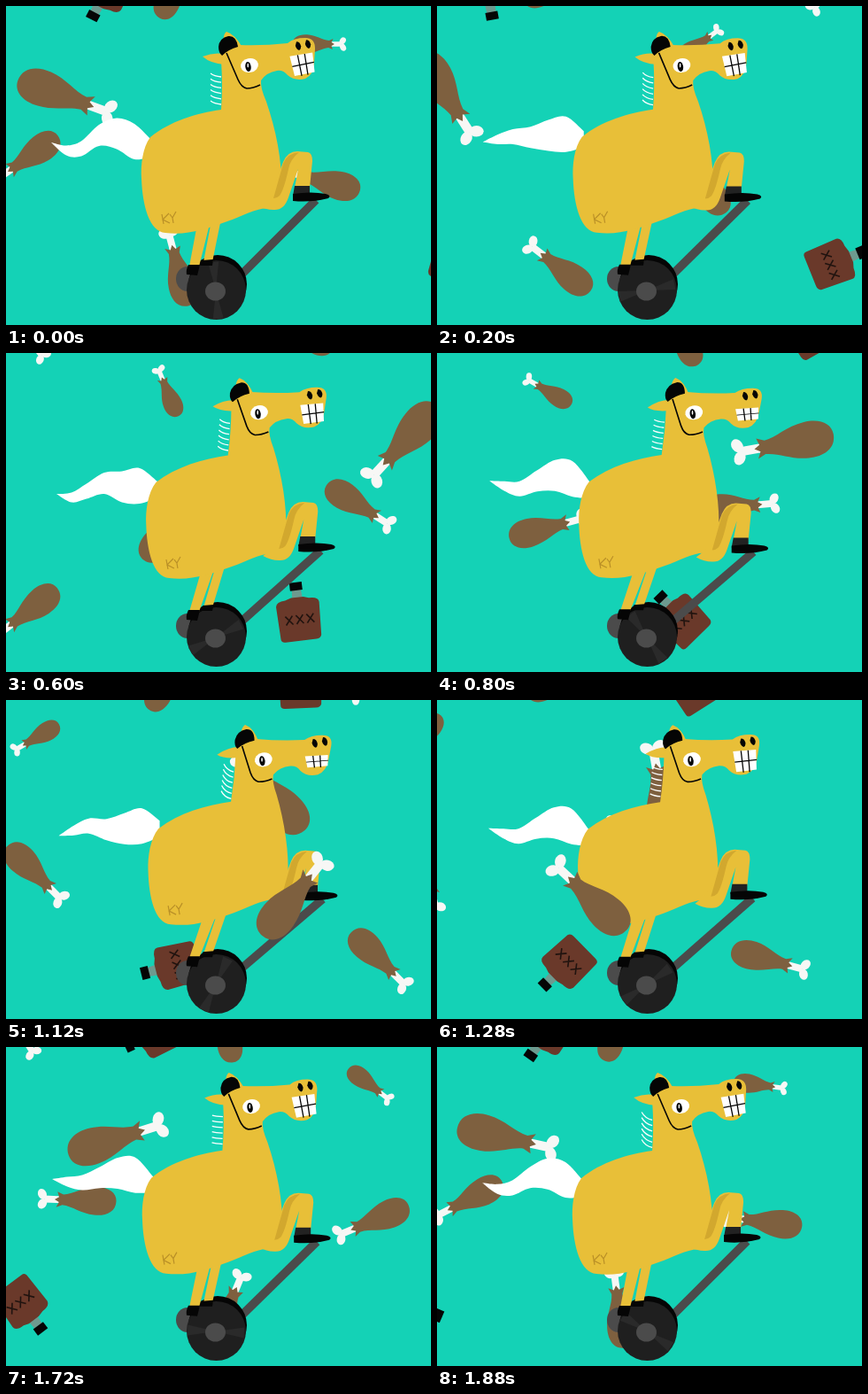
Animation of 480 by 360 pixels, one loop 1.92 s. Source, as an HTML page with a canvas:

```html
<!DOCTYPE html>
<html lang="en">
<head>
<meta charset="utf-8">
<title>Horse on a scooter</title>
<style>
html, body { margin: 0; width: 100%; height: 100%; overflow: hidden; background: #14d2b6 }
canvas { display: block }
</style>
</head>
<body>
<canvas id="stage" width="480" height="360"></canvas>
<script>
const g = document.getElementById('stage').getContext('2d');
const STEPS = 48, STEP_MS = 40, SPAN = 550, TURN = 7.5;
const SKY = '#14d2b6', COAT = '#e8bf38', SHADE = '#d2a82e', MEAT = '#7e603f',
      GLASS = '#6a392a', GREY = '#4b4b4b', TYRE = '#1f1f1f', BLACK = '#050505';
const rad = d => d * Math.PI / 180;
const lerp = (a, b, u) => a + (b - a) * u;
const clamp = v => Math.max(0, Math.min(1, v));

// Linear blend between rows [step, ...values], wrapping at the period
function key(rows, n, period) {
  n %= period;
  let i = rows.length - 1;
  while (rows[i][0] > n) i--;
  const a = rows[i], b = rows[i + 1] || [period, ...rows[0].slice(1)];
  const u = (n - a[0]) / (b[0] - a[0]);
  return a.slice(1).map((v, j) => lerp(v, b[j + 1], u));
}

// Path text whose "x,y" pairs pass through a bending function
function bend(d, map) {
  return new Path2D(map ? d.replace(/(-?[\d.]+),(-?[\d.]+)/g, (_, x, y) => map(+x, +y).join(',')) : d);
}
function fill(color, d, map) {
  g.fillStyle = color;
  g.fill(bend(d, map));
}
function line(color, width, d, map) {
  g.strokeStyle = color;
  g.lineWidth = width;
  g.stroke(bend(d, map));
}
function oval(color, x, y, rx, ry = rx, turn = 0) {
  g.fillStyle = color;
  g.beginPath();
  g.ellipse(x, y, rx, ry, turn, 0, 7);
  g.fill();
}
function at(x, y, deg, scale, draw) {
  g.save();
  g.translate(x, y);
  g.rotate(rad(deg));
  g.scale(scale, scale);
  draw();
  g.restore();
}
// Smooth curve through all points, continuing the current path
function curve(pts) {
  for (let i = 0; i < pts.length - 1; i++) {
    const a = pts[i], b = pts[i + 1], before = pts[i - 1] || a, after = pts[i + 2] || b;
    g.bezierCurveTo(a[0] + (b[0] - before[0]) / 6, a[1] + (b[1] - before[1]) / 6,
                    b[0] - (after[0] - a[0]) / 6, b[1] - (after[1] - a[1]) / 6, ...b);
  }
}

function drumstick() {
  fill('#f7f7f5', 'M16,-4 L36,-4 L37,4 L16,4Z');
  oval('#f7f7f5', 39, -5.5, 6.3, 4.9, -1);
  oval('#f7f7f5', 39.5, 5.5, 6.3, 4.9, 1.1);
  fill(MEAT, 'M-46,1 C-46,-12 -34,-17 -21,-16 C-6,-15 4,-7 16,-6 L23,-9 L20,-3 L25,0 L20,3 L22,9 L15,6 C4,7 -6,15 -22,16 C-36,17 -46,11 -46,1Z');
}

function bottle() {
  g.translate(-5, -5);
  fill('#6d9a8f', 'M22,-6 L34,-5 L34,5 L22,6Z');
  fill(BLACK, 'M33,-7 L42,-7 L42,7 L33,7Z');
  fill(GLASS, 'M-20,-24 L17,-25 Q23,-24 23,-14 L25,-7 L25,7 L23,13 Q23,24 17,24 L-20,22 Q-24,21 -24,16 L-24,-19 Q-24,-24 -20,-24Z');
  for (const y of [-12, 0, 12]) line('#20130f', 1.6, `M-5,${y - 4} L5,${y + 4} M5,${y - 4} L-5,${y + 4}`);
}

// Flying things: step, x and angle at that step, height, scale, spin direction
const flyers = [
  [20, 390, 170, 103, 1.28, 1, drumstick],
  [20, 343, -5, 173, 0.98, -1, drumstick],
  [20, 126, -15, 197, 1, 1, drumstick],
  [20, 125, 210, 43, 0.67, -1, drumstick],
  [28, 423, 45, 294, 1, -1, drumstick],
  [39, 295, 230, -22, 0.87, 1, drumstick],
  [20, 276, 245, -22, 0.87, 1, drumstick],
  [9, 405, -52, 295, 1, -1, bottle],
  [39, 212, 185, -20, 1, -1, bottle]
];
function drawFlyers(n) {
  for (const [n0, x0, a0, y, scale, spin, draw] of flyers) {
    const x = x0 - (n - n0) * SPAN / STEPS, angle = a0 + (n - n0) * TURN * spin;
    for (const lap of [-1, 0, 1]) at(x + lap * SPAN, y, angle, scale, draw);
  }
}

const tailX = [165, 145, 125, 105, 85, 68, 51];
const tailWidth = [9, 20, 17.5, 12, 8.5, 5.5, 0];
const tailY = [
  [0, 161, 153, 144, 146, 161, 163, 154],
  [3, 156, 152, 153, 149, 158, 165, 161],
  [4, 148, 145, 148, 149, 145, 150, 156],
  [8, 158, 145, 141, 147, 156, 153, 147],
  [9, 158, 144, 142, 150, 155, 155, 152]
];
function drawTail(n, k) {
  const ys = key(tailY, n, 12);
  const side = s => tailX.map((x, i) => [x + 9 * k, ys[i] - 3 * k + s * tailWidth[i]]);
  const top = side(-1);
  g.fillStyle = '#fff';
  g.beginPath();
  g.moveTo(...top[0]);
  curve(top);
  curve(side(1).reverse());
  g.fill();
}

function drawScooter(n, k) {
  oval(GREY, 205, 308, 13, 14);
  line(GREY, 9.5, `M267,302 L${350 + 8 * k},${219 + 6 * k}`);
  oval(BLACK, 239, 314, 33);
  oval(TYRE, 237.5, 320.5, 33.5);
  at(237, 321, 85 + n * 52.5, 1, () => fill('#2a2a2a', 'M0,0 L32,-6 L32,6Z M0,0 L-32,-6 L-32,6Z'));
  oval(GREY, 236.5, 322, 11.5, 10.5);
}

const maneSlope = [[0, 4], [9, 7], [20, 3], [28, 9], [32, 3], [39, -6], [47, 9]];
const grin = [[0, 1], [14, 1], [20, 0.58], [28, 0.56], [32, 1.02], [39, 1.05], [47, 1]];

function drawHorse(n, k) {
  // The body leans: the higher the point, the farther it sways; the head also nods
  const lean = (x, y) => [
    x + k * (y > 250 ? 7.5 * clamp((290 - y) / 40) : 7.5 + 11.5 * ((250 - y) / 200) ** 2.5),
    y + k * (clamp((150 - y) / 90) * (2 + 5 * clamp((x - 250) / 80)) - 3)
  ];
  const step = (x, y) => [x + 9.5 * k, y + 6 * k];

  fill(COAT, 'M216,246 L230,246 L218,294 L207,294Z M232,242 L243,240 L233,289 L223,289Z', lean);
  fill(BLACK, 'M206,292 L219,292 L216,304 L204,303 Q203,298 206,292Z M222,287 L234,286 L233,293 L219,293Z', lean);
  fill(COAT, 'M246,50 Q244,32 249,29 Q259,32 267,47Z ' +
    `M222,${57 + 6 * k} Q234,${52 + 2 * k} 246,54 L247,66 Q231,${65 + 3 * k} 222,${57 + 6 * k}Z`, lean);
  fill(COAT, 'M243,117 C215,121 185,130 163,148 C154,160 152,180 153,195 C154,225 162,255 180,256 ' +
    'C205,259 225,252 250,243 C270,236 285,226 300,229 L311,205 C312,175 305,140 294,108 Q287,92 288,84 ' +
    'Q294,75 306,73 Q313,72 318,78 Q326,85 338,82 Q347,78 348,65 L349,48 Q349,36 338,36 Q325,36 318,42 ' +
    'Q290,45 264,44 L246,52 L243,62 Q245,90 243,117Z', lean);

  // Raised front legs
  fill(COAT, 'M284,225 Q300,214 304,200 L313,176 Q318,164 329,164 L341,165 Q346,166 346,175 L343,205 ' +
    'L326,205 L330,184 L319,216 Q314,231 302,230 Q293,230 284,225Z', step);
  fill(SHADE, 'M302,217 L313,178 Q318,166 331,165 Q321,173 319,184 Q314,207 309,214 Q306,217 302,217Z', step);
  fill('#222', 'M326,203 L343,203 L343,214 L324,214Z', step);
  fill(BLACK, 'M324,212 Q345,209 361,212 Q368,214 364,217 Q345,222 324,220Z', step);
  line('#b98f27', 1.2, 'M176,235 L178,246 M184,234 L177,241 L185,245 M185,235 L188,239 L192,232 M188,239 L189,245', lean);

  // Head
  fill(BLACK, 'M240,46 Q241,36 251,34 Q260,33 262,46 Q251,49 244,56 Q240,53 240,46Z', lean);
  line(BLACK, 1.6, 'M249,53 L262,83 Q266,92 272,93 Q279,93 287,89', lean);
  const slope = key(maneSlope, n, STEPS)[0];
  for (let i = 0; i < 6; i++) {
    const y = 78 + i * 6.2 - slope / 2;
    line('#fff', 1.3, `M231,${y} Q235,${y + slope * 0.8} 243,${y + slope}`, lean);
  }
  const [ex, ey] = lean(275, 67);
  oval('#fff', ex, ey, 10, 8, -0.2);
  oval(BLACK, ex - 1.5, ey + 1.5, 3.2, 5.6, -0.15);
  oval('#fff', ex - 1.8, ey, 0.8, 2.6);
  for (const [x, y] of [[330, 45], [341, 43]]) {
    const [p, q] = lean(x, y);
    at(p, q, -12, 1, () => fill(BLACK, 'M-1,-5 Q3,-4 3,1 Q2,5 0,5 Q-3,3 -3,-1Z'));
  }
  const [tx, ty] = lean(335, 65.5);
  at(tx, ty, lerp(-9, -3, k), 1, () => {
    g.scale(1, key(grin, n, STEPS)[0]);
    fill('#fff', 'M-13,-11 L13,-11 L12,11 L-11,12Z');
    line(BLACK, 1.3, 'M-12,1 L13,0 M-4,-11 L-3,13 M4,-11 L4,13');
  });
}

// One big drumstick sweeps past in front
function drawNear(n) {
  at(326 - (n - 28) * 38.75, 221, -51 - (n - 28) * 21.5, 1.26, drumstick);
}

const start = performance.now();
function frame() {
  const n = Math.floor((performance.now() - start) / STEP_MS) % STEPS;
  const k = (1 - Math.cos(2 * Math.PI * (n - 0.5) / STEPS)) / 2;
  g.fillStyle = SKY;
  g.fillRect(0, 0, 480, 360);
  drawFlyers(n);
  drawTail(n, k);
  drawScooter(n, k);
  drawHorse(n, k);
  drawNear(n);
  requestAnimationFrame(frame);
}
frame();
</script>
</body>
</html>
```
